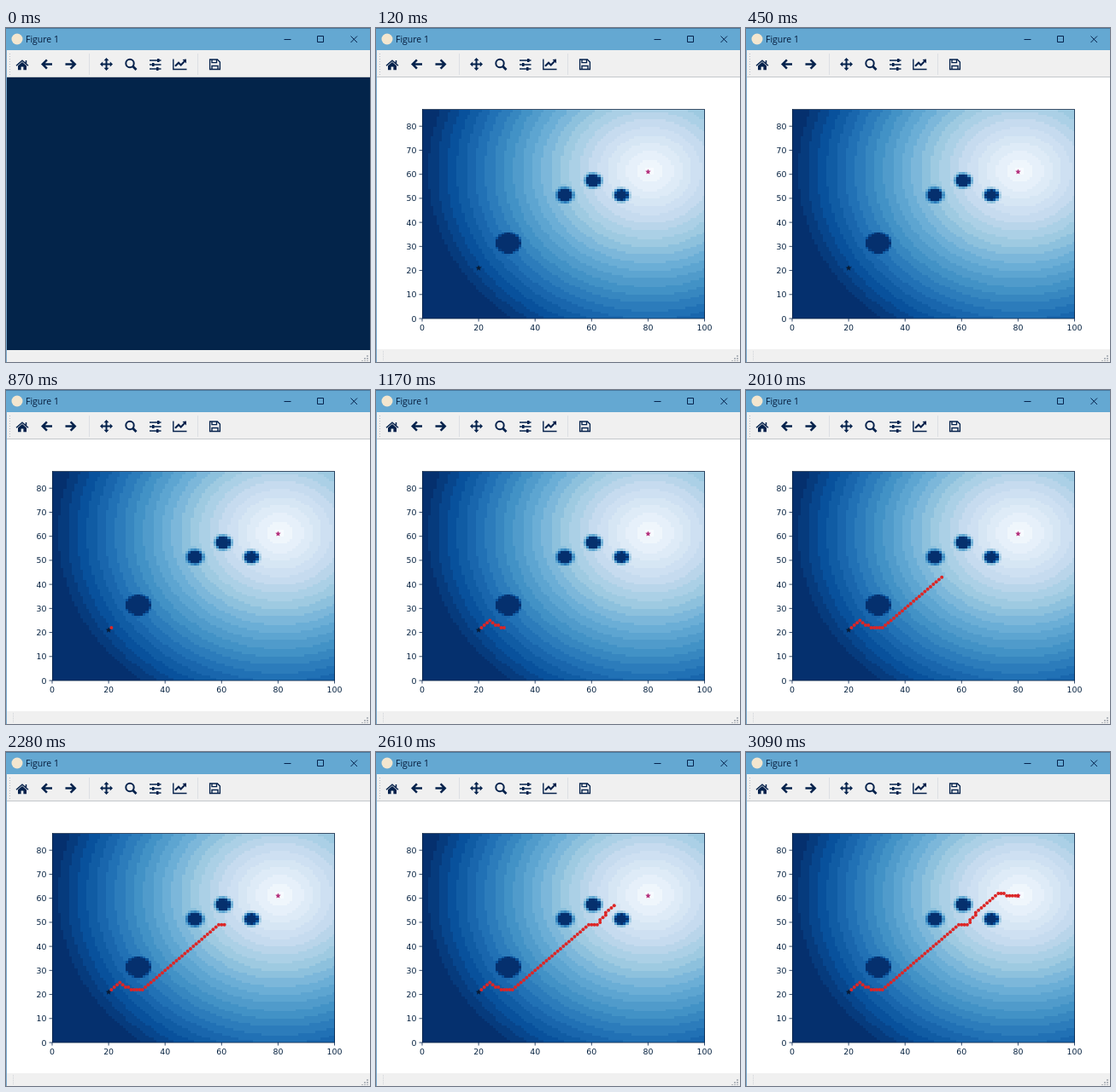
Recreate the animation shown at these times as an HTML page with a canvas. Size 426 px wide and 392 px high, loop 3.15 s.

```html
<!DOCTYPE html>
<html lang="en">
<head>
<meta charset="utf-8">
<title>Figure 1</title>
<style>
  html, body { margin: 0; width: 100%; height: 100%; overflow: hidden; background: #fff; }
  #stage { position: relative; width: 426px; height: 392px; overflow: hidden; }
  #heat { position: absolute; left: 54px; top: 95.5px; width: 330.5px; height: 245.5px; image-rendering: pixelated; }
  svg { position: absolute; left: 0; top: 0; display: block; }
  .title { font: 10.5px "Open Sans", "Noto Sans", sans-serif; fill: #061c3c; }
  .tick { font: 9.4px "DejaVu Sans", sans-serif; fill: #04203f; }
  .line { fill: none; stroke: #05224c; }
  .icon { fill: #05224c; }
  .dot { fill: #dc2626; }
</style>
</head>
<body>
<div id="stage">
  <canvas id="heat" width="100" height="87"></canvas>
  <svg width="426" height="392" viewBox="0 0 426 392">
    <!-- title bar -->
    <rect width="426" height="26" fill="#64a8d2"/>
    <rect width="426" height="1" fill="#47799f"/>
    <circle cx="13" cy="13" r="6.5" fill="#f3e6cf"/>
    <text class="title" x="23" y="17">Figure 1</text>
    <path class="line" d="M325.5 13.5h8M364.5 9.5h7v7h-7zM403.500 9.500l7.500 7.500m0-7.500l-7.500 7.500"/>

    <!-- toolbar -->
    <rect y="26" width="426" height="32" fill="#f0f0f0"/>
    <path d="M0 57.500H426" stroke="#c3c7cb"/>
    <path d="M4.500 30v25" stroke="#b4bcc6" stroke-dasharray="1 2"/>
    <path d="M97.500 30v25M224.500 30v25" stroke="#dcdfe3"/>
    <g class="icon">
      <path d="M14 44.200l5-4.200 5 4.200v5h-3.600v-3.600h-2.800v3.600H14z"/>
      <path id="arrow" d="M41 42.500l6-6 1.800 1.800-3 3H54v2.500h-8.200l3 3-1.800 1.800z"/>
      <use href="#arrow" transform="matrix(-1 0 0 1 123.500 0)"/>
      <path d="M117.500 35l3 3.200h-2v3.300h3.300v-2l3.200 3-3.200 3v-2h-3.300v3.300h2l-3 3.200-3-3.200h2v-3.300h-3.300v2l-3.200-3 3.200-3v2h3.300v-3.300h-2z"/>
      <path d="M211 36.500v5l-1.500-1.500-4.800 4.900-2.700-2.700-3.300 3.400-1.500-1.500 4.800-4.900 2.700 2.700 3.300-3.400-1.500-1.500z"/>
      <path d="M177 36h2.500v4H177zM171 41h2.500v4H171zM176 46h2.500v4H176z"/>
    </g>
    <g class="line">
      <path d="M12 44.200l7-6 7 6M23.500 38v3.500" stroke-width="1.500"/>
      <circle cx="145" cy="41.500" r="4.700" stroke-width="2"/>
      <path d="M148.500 45l4 4" stroke-width="2.800"/>
      <path d="M168 38h13.500M168 43h13.500M168 48h13.500" stroke-width="1.300"/>
      <path d="M195.800 36.500v12h15.700" stroke-width="1.400"/>
      <path d="M238.600 37h8.800l3 3v8.500h-11.800zM241 37v3.600h5.500V37M241 48.500v-4h7v4" stroke-width="1.400"/>
    </g>

    <!-- status bar -->
    <rect y="377" width="426" height="15" fill="#f0f0f0"/>
    <path id="mark" d="M8.500 379v12" stroke="#d0d4d8" stroke-dasharray="1 1"/>
    <path d="M423 384v7M420 387v4M417 390v1" stroke="#b2b7bd" stroke-width="2" stroke-dasharray="2 1"/>

    <g id="axes">
      <rect x="54.500" y="95.500" width="330" height="245.500" fill="none" stroke="#0a2344" stroke-width=".8"/>
    </g>
    <g id="trail"></g>
    <rect id="blank" x="1" y="58" width="425" height="320" fill="#03244a"/>
    <path d="M.5 26V392" stroke="#78a9cd"/>
  </svg>
</div>
<script>
const LOOP = 3150, PLOT_AT = 30, FIRST_DOT = 857.6, DOT_GAP = 35.3;
const byId = id => document.getElementById(id);
const px = x => 54 + x * 3.305;
const py = y => 341 - y * 2.822;

function add(parent, tag, attrs, text = '') {
  const node = document.createElementNS('http://www.w3.org/2000/svg', tag);
  for (const key in attrs) node.setAttribute(key, attrs[key]);
  node.textContent = text;
  return byId(parent).appendChild(node);
}

// Potential field: distance to the goal plus a bump around each obstacle
const goal = [80, 61], start = [20, 21];
const obstacles = [[30, 31, 5.2, 2.2], [50, 51, 4.3, 2.4], [60, 57, 4.3, 2.4], [70, 51, 4, 2.1]];
const ramp = [[247, 251, 255], [222, 235, 247], [198, 219, 239], [158, 202, 225],
  [107, 174, 214], [66, 146, 198], [33, 113, 181], [8, 81, 156], [5, 48, 110]];
const LEVELS = 24;

function potential(x, y) {
  let v = Math.hypot(x - goal[0], y - goal[1]) / 80;
  for (const [ox, oy, reach, width] of obstacles) {
    v += (Math.max(0, reach - Math.hypot(x - ox, y - oy)) / width) ** 2;
  }
  return Math.min(1, v);
}

function shade(v) {
  const t = Math.round(v * LEVELS) / LEVELS * 8;
  const i = Math.min(7, Math.floor(t));
  return `rgb(${ramp[i].map((c, k) => Math.round(c + (ramp[i + 1][k] - c) * (t - i)))})`;
}

const ctx = byId('heat').getContext('2d');
for (let x = 0; x < 100; x++) {
  for (let y = 0; y < 87; y++) {
    ctx.fillStyle = shade(potential(x, y));
    ctx.fillRect(x, 86 - y, 1, 1);
  }
}

// Ticks and labels
for (let v = 0; v <= 100; v += 20) {
  add('axes', 'path', { class: 'line', 'stroke-width': .8, d: `M${px(v)} 341v3.500` });
  add('axes', 'text', { class: 'tick', x: px(v), y: 355, 'text-anchor': 'middle' }, v);
}
for (let v = 0; v <= 80; v += 10) {
  add('axes', 'path', { class: 'line', 'stroke-width': .8, d: `M54 ${py(v)}h-3.500` });
  add('axes', 'text', { class: 'tick', x: 47.5, y: py(v) + 3.5, 'text-anchor': 'end' }, v);
}

function star([x, y], r, fill) {
  const points = Array.from({ length: 10 }, (_, i) => {
    const a = i * Math.PI / 5, d = i % 2 ? r * .45 : r;
    return [px(x) + d * Math.sin(a), py(y) - d * Math.cos(a)];
  });
  add('axes', 'polygon', { points: points.join(' '), fill });
}
star(start, 3.6, '#081a33');
star(goal, 3.4, '#b3307c');

// The route turns at these cells and moves one cell per step between them
const turns = [[21, 22], [24, 25], [26, 23], [27, 23], [28, 22], [32, 22], [59, 49], [62, 49],
  [63, 50], [63, 51], [65, 53], [65, 54], [73, 62], [75, 62], [76, 61], [80, 61]];
const route = [turns[0]];
for (const [tx, ty] of turns.slice(1)) {
  let [x, y] = route[route.length - 1];
  while (x !== tx || y !== ty) {
    x += Math.sign(tx - x);
    y += Math.sign(ty - y);
    route.push([x, y]);
  }
}
const dots = route.map(([x, y]) => add('trail', 'circle', { class: 'dot', cx: px(x), cy: py(y), r: 2 }));

const show = (node, on) => { node.style.display = on ? '' : 'none'; };

function draw(now) {
  const t = now % LOOP;
  const count = Math.floor((t - FIRST_DOT) / DOT_GAP) + 1;
  show(byId('blank'), t < PLOT_AT);
  show(byId('mark'), t >= PLOT_AT);
  dots.forEach((dot, i) => show(dot, i < count));
}

const begin = performance.now();
function tick() {
  draw(performance.now() - begin);
  requestAnimationFrame(tick);
}
draw(0);
requestAnimationFrame(tick);
</script>
</body>
</html>
```
